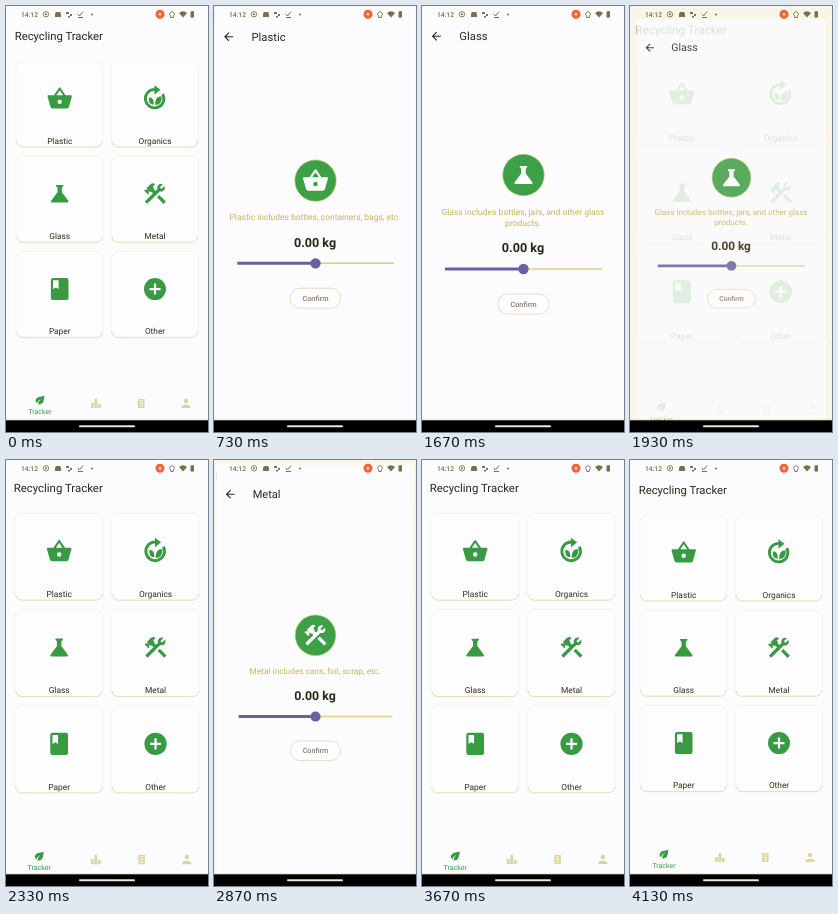
These frames come from a looping animation (202x426 px, 4190 ms). An HTML page:

```html
<!DOCTYPE html>
<html lang="en">
<head>
<meta charset="utf-8">
<title>Recycling Tracker</title>
<style>
html, body { margin: 0; width: 100%; height: 100%; overflow: hidden; background: #fcfbfe; }
svg { display: block; width: 100vw; height: 100vh; font-family: Roboto, sans-serif; text-rendering: geometricPrecision; }
.title { font-size: 11.3px; fill: #2b2818; }
.label, .note { font-size: 8.3px; text-anchor: middle; }
.label { fill: #2f2d12; }
.note { font-size: 8.5px; fill: #c8b45c; }
.card { fill: #fdfcff; stroke: #f4f3e6; stroke-width: .7; }
.pale { fill: #dbd59f; }
.green { fill: #389a43; }
</style>
</head>
<body>
<svg viewBox="0 0 202 426">
  <g id="home">
    <rect width="202" height="426" fill="#fcfbfe"/>
    <text class="title" x="8.700" y="34.300">Recycling Tracker</text>
    <g id="cards"></g>
    <path class="green" transform="translate(27.800 387.800) scale(.53)" d="M6 8a7 7 0 0 0 0 10c1.500-3.400 4.100-6.300 7.400-8A16 16 0 0 0 8 19.300c2.600 1.200 5.800.8 8-1.400C19.400 14.500 20 4 20 4S9.500 4.600 6 8z"/>
    <text x="34" y="407.700" font-size="7" text-anchor="middle" class="green">Tracker</text>
    <g class="pale">
      <path d="M85 397h2.800v5H85zm3.500-4h2.800v9h-2.800zm3.500 5h2.800v4H92z"/>
      <path fill-rule="evenodd" d="M132 393h6.500v9H132zm1.500 1.500v1h3.500v-1zm0 2.500v1h3.500v-1zm0 2.500v1h3.500v-1z"/>
      <circle cx="180" cy="395" r="2.200"/>
      <path d="M175.500 402v-1.500q4.500-4 9 0v1.500z"/>
    </g>
  </g>
  <rect id="shade" width="202" height="426" fill="#e8da80"/>
  <g id="page">
    <rect width="202" height="426" fill="#fcfbfe"/>
    <path fill="#2b2818" transform="translate(7.600 23.500) scale(.56)" d="M20 11H7.800l5.600-5.600L12 4l-8 8 8 8 1.400-1.400L7.800 13H20z"/>
    <text class="title" id="name" x="37.300" y="34"></text>
    <g id="upper">
      <circle cx="101.500" cy="174.500" r="20.700" fill="#3d9f46" stroke="#b5c860" stroke-width=".7"/>
      <g id="badge" fill="#fff" color="#fff"></g>
      <text class="note" id="line1" x="101" y="214"></text>
    </g>
    <g id="lower">
      <text class="note" id="line2" x="101" y="214"></text>
      <text x="101" y="240.700" font-size="12.600" font-weight="700" text-anchor="middle" fill="#2b2412">0.00 kg</text>
      <path d="M101 257.500H180" stroke="#e0cb8c" stroke-width="1.500"/>
      <path d="M23 257.500H101" stroke="#6d5f9f" stroke-width="3"/>
      <circle cx="101.500" cy="257.500" r="5.200" fill="#6d5f9f"/>
      <rect x="76" y="282.500" width="51" height="20" rx="10" fill="#fdfcff" stroke="#e6d5b0" stroke-width=".8"/>
      <text x="101.500" y="295" font-size="7.300" font-weight="500" text-anchor="middle" fill="#877963">Confirm</text>
    </g>
  </g>
  <g id="system" fill="#77704a">
    <text x="15" y="10.700" font-size="6.700" font-weight="500">14:12</text>
    <circle cx="40" cy="8.300" r="2.700" fill="none" stroke="#8c8454"/>
    <circle cx="40" cy="8.300" r="1"/>
    <path d="M49 11V8l1-2h4l1 2v3z"/>
    <path d="M60 6h3v2h-3zm4 2h2v2h-2zm-2 2h2v1.500h-2z"/>
    <path d="M72 8l1.500 2L77 5.500M72 11.500h5" fill="none" stroke="#77704a"/>
    <circle cx="86" cy="8.500" r="1"/>
    <circle cx="154" cy="8.300" r="4.500" fill="#ee6238"/>
    <path d="M152 8.300h4M154 6.300v4" stroke="#fbd9c4" stroke-width=".9"/>
    <path d="M164.700 11.500V10a2.300 2.300 0 1 1 2.600 0v1.500z" fill="none" stroke="#77704a" stroke-width=".9"/>
    <path d="M173 7q4-3.500 8 0l-4 4.500z"/>
    <path d="M184.500 5.500h1V5h1.500v.5h1v6h-3.500z"/>
    <rect y="413.500" width="202" height="1" fill="#e6e0b0"/>
    <rect y="414.300" width="202" height="12" fill="#000"/>
    <rect x="73" y="419.300" width="56" height="1.900" rx=".95" fill="#e4e4e4"/>
  </g>
</svg>
<script>
const LOOP = 4190, STEP = 1000 / 15, MOVE = 300;
const $ = id => document.getElementById(id);
const clamp = v => Math.min(1, Math.max(0, v));
const path = d => `<path fill-rule="evenodd" d="${d}"/>`;

const icons = {
  Plastic: path("M17.2 9l-4.400-6.600a1 1 0 0 0-1.600 0L6.800 9H2a1 1 0 0 0-1 1.300l2.600 9.200A2 2 0 0 0 5.500 21h13a2 2 0 0 0 1.900-1.500L23 10.300A1 1 0 0 0 22 9zM9 9l3-4.400L15 9zm3 8a2 2 0 1 1 0-4 2 2 0 0 1 0 4z"),
  Organics: `<path d="M19 8A8.400 8.400 0 1 1 12 3.700" fill="none" stroke="currentColor" stroke-width="2.600"/>`
    + path("M11.500 0l5.500 4-5.500 4.500zM11 17.500c-4 0-5-3-4.500-6.500 3 0 4.500 1.500 4.500 6.500zM12.300 18c-.5-5 1.700-8 5.700-8 .5 4-1 8-5.700 8z"),
  Glass: path("M19.800 18.400L14 10.700V6.500l1.400-1.700A.5.5 0 0 0 15 4H9a.5.5 0 0 0-.4.8L10 6.500v4.200l-5.800 7.700A1 1 0 0 0 5 20h14a1 1 0 0 0 .8-1.600z"),
  Metal: path("M13.800 15.200l2.100-2.100 6 6-2.100 2.100z")
    + path("M17.500 10A3.500 3.500 0 0 0 20.600 4.900l-2.700 2.700-1.500-1.500 2.700-2.700A3.500 3.500 0 0 0 14.200 7.700l-1.800 1.800-1.800-1.800.7-.7-1.400-1.400L12 3.500a3 3 0 0 0-4.200 0L4.200 7l1.400 1.400H2.800l-.7.7 3.500 3.600.7-.7V9.200l1.400 1.400.7-.7 1.800 1.700L2.800 19l2.100 2.100L16.300 9.800z"),
  Paper: path("M18 2H6a2 2 0 0 0-2 2v16a2 2 0 0 0 2 2h12a2 2 0 0 0 2-2V4a2 2 0 0 0-2-2zM6 4h5v8l-2.500-1.500L6 12z"),
  Other: path("M12 2a10 10 0 1 0 0 20 10 10 0 0 0 0-20zm5 11h-4v4h-2v-4H7v-2h4V7h2v4h4z")
};

// name, time opened, time closed, description lines
const visits = [
  ["Plastic", 24, 715, "Plastic includes bottles, containers, bags, etc."],
  ["Organics", 955, 1110, "Organics includes food scraps, leaves, etc."],
  ["Glass", 1291, 1874, "Glass includes bottles, jars, and other glass", "products."],
  ["Metal", 2291, 2825, "Metal includes cans, foil, scrap, etc."],
  ["Paper", 3040, 3360, "Paper includes newspapers, cardboard, etc."],
  ["Other", 3625, 3850, "Other includes mixed materials, etc."]
];

const place = (icon, x, y, s) =>
  `<g transform="translate(${x} ${y}) scale(${s}) translate(-12 -12)">${icons[icon]}</g>`;

$("cards").innerHTML = Object.keys(icons).map((name, i) => {
  const x = 10 + i % 2 * 95.3, y = 55 + (i >> 1) * 95.3;
  return `<rect class="card" x="${x}" y="${y}" width="87" height="86" rx="7"/>
    <path d="M${x + .5} ${y + 80}q1 6 7 6h72q6 0 7-6" fill="none" stroke="#dfe0ac" stroke-width=".9"/>
    <g class="green" color="#389a43">${place(name, x + 43.7, y + 37.5, 1.1)}</g>
    <text class="label" x="${x + 43.7}" y="${y + 82.7}">${name}</text>`;
}).join("");

const bezier = (a, b, c, d, u) => {
  const v = 1 - u;
  return a * v ** 3 + 3 * b * u * v * v + 3 * c * u * u * v + d * u ** 3;
};

// Two joined curves: a quick start and a very slow finish.
function ease(p) {
  const [xs, ys] = p < 1 / 6
    ? [[0, .05, .1333, 1 / 6], [0, 0, .06, .4]]
    : [[1 / 6, .2083, .25, 1], [.4, .82, 1, 1]];
  let lo = 0, hi = 1;
  for (let i = 0; i < 20; i++) {
    const mid = (lo + hi) / 2;
    if (bezier(...xs, mid) < p) lo = mid; else hi = mid;
  }
  return bezier(...ys, lo);
}

const zoom = (el, s) =>
  el.setAttribute("transform", `translate(101 213) scale(${s}) translate(-101 -213)`);

let shown;
function fill([name, , , first, second = ""]) {
  if (shown === name) return;
  shown = name;
  $("name").textContent = name;
  $("line1").textContent = first;
  $("line2").textContent = second;
  $("badge").innerHTML = place(name, 101.5, 174.5, 1.13);
  const shift = second ? 5.5 : 0;
  $("upper").setAttribute("transform", `translate(0 ${-shift})`);
  $("lower").setAttribute("transform", `translate(0 ${shift})`);
}

function draw(now) {
  const t = Math.floor((now % LOOP + 4) / STEP) * STEP;
  const visit = visits.findLast(v => v[1] <= t);
  let homeScale = 1, pageScale = 1, alpha = 0;
  if (visit) {
    const closing = t >= visit[2];
    const p = clamp((t - visit[closing ? 2 : 1]) / MOVE);
    const e = ease(p), fade = clamp((p - .18) / .12);
    homeScale = closing ? 1.1 - .1 * e : 1 + .05 * e;
    pageScale = closing ? 1 - .1 * e : .85 + .15 * e;
    alpha = closing ? 1 - fade : fade;
    fill(visit);
  }
  zoom($("home"), homeScale);
  zoom($("page"), pageScale);
  $("page").setAttribute("opacity", alpha);
  $("shade").setAttribute("opacity", .2 * alpha);
}

const start = performance.now();
function tick() {
  draw(performance.now() - start);
  requestAnimationFrame(tick);
}
tick();
</script>
</body>
</html>
```
